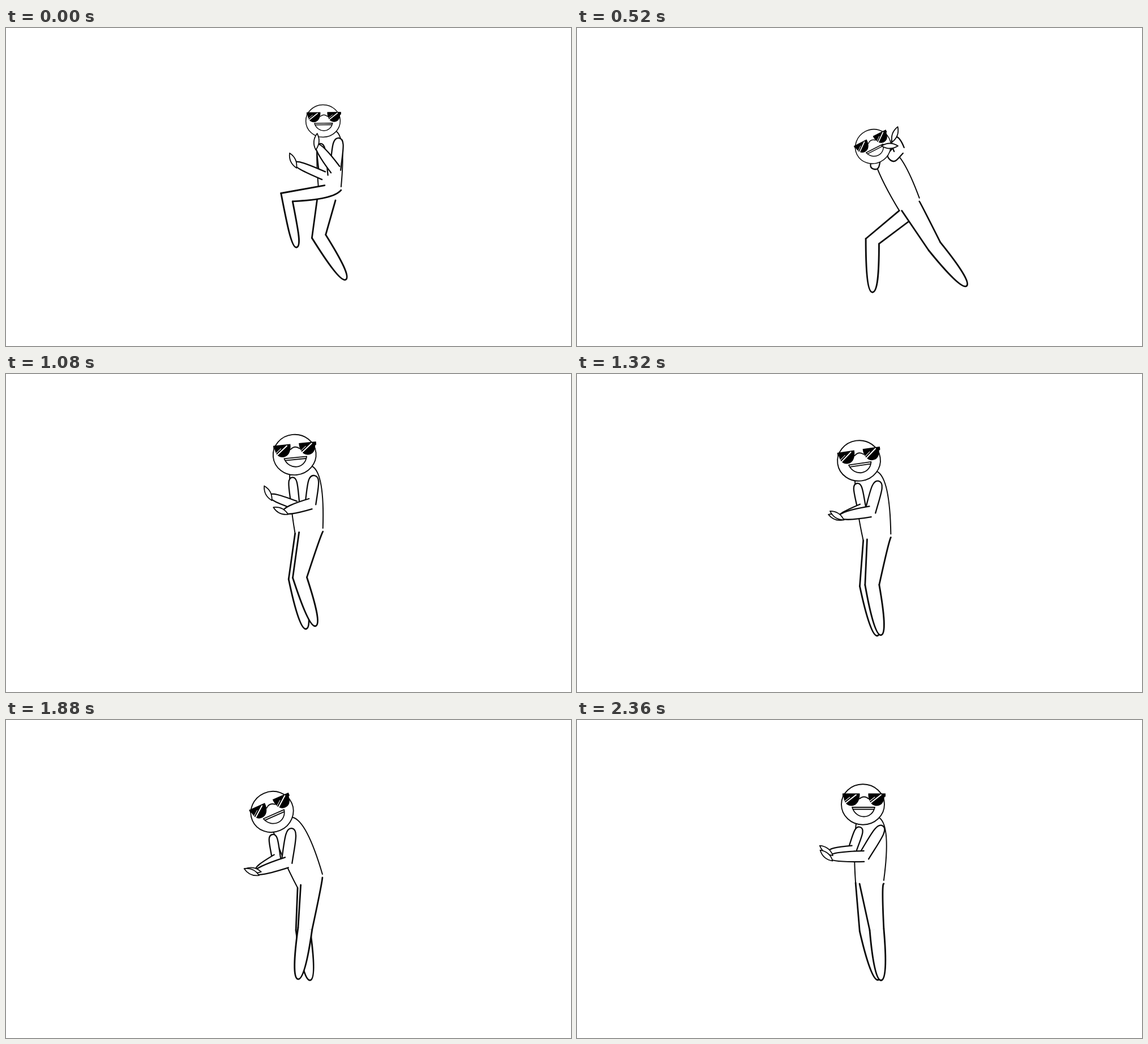
An HTML page with a canvas for the animation above (2400 ms loop, 998x561 px).

```html
<!DOCTYPE html>
<html lang="en">
<head>
<meta charset="utf-8">
<title>Dancing figure</title>
<style>
  html, body { margin: 0; width: 100%; height: 100%; overflow: hidden; background: #fff; }
  canvas { display: block; }
</style>
</head>
<body>
<canvas width="998" height="561"></canvas>
<script>
const ctx = document.querySelector('canvas').getContext('2d');
const LOOP = 2400, STEP = 40, THIGH = 81, SHIN = 90, HAND = 29;

// time, head x y, hip x y, near thigh and shin angle, far thigh and shin angle,
// near wrist x y, near elbow bend, far wrist x y, far elbow bend
const poses = [
  [0, 560, 164, 572, 282, -81, 11, -6, 32, 548, 205, 52, 509, 238, 49],
  [520, 523, 209, 587, 311, 30, 39, -42, 0, 560, 192, -13, 548, 208, 8],
  [840, 517, 138, 547, 268, -17, 26, -14, 11, 526, 235, 21, 471, 191, 52],
  [1320, 498, 153, 530, 288, -9, 10, -5, 12, 463, 252, 30, 462, 254, 28],
  [1640, 451, 198, 549, 293, 5, -4, 2, 1, 457, 306, 30, 460, 300, 20],
  [1880, 470, 162, 537, 284, -9, -8, -1, 8, 438, 270, 32, 441, 266, 24],
  [2360, 505, 149, 517, 285, 6, 5, 4, 13, 444, 242, 30, 444, 233, 23]];

const smooth = u => u * u * (3 - 2 * u);
const add = ([x, y], [dx, dy], k = 1) => [x + dx * k, y + dy * k];
const mix = ([ax, ay], [bx, by]) => [(ax + bx) / 2, (ay + by) / 2];
const sub = (a, b) => add(a, b, -1);
const unit = ([x, y]) => { const d = Math.hypot(x, y) || 1; return [x / d, y / d]; };
const side = ([x, y]) => [y, -x];
// Angles run in degrees from straight down towards the right
const aim = angle => [Math.sin(angle * Math.PI / 180), Math.cos(angle * Math.PI / 180)];

// Smooth interpolation without overshoot
function poseAt(t) {
  const last = poses.length - 1;
  let i = 0;
  while (i < last - 1 && t >= poses[i + 1][0]) i++;
  const span = poses[i + 1][0] - poses[i][0], u = (t - poses[i][0]) / span;
  return poses[i].map((from, k) => {
    const secant = j => (poses[j + 1][k] - poses[j][k]) / (poses[j + 1][0] - poses[j][0]);
    const slope = j => {
      const a = secant(Math.max(j - 1, 0)), b = secant(Math.min(j, last - 1));
      return a * b > 0 ? 2 * a * b / (a + b) : 0;
    };
    return from + (poses[i + 1][k] - from) * smooth(u)
      + span * u * (1 - u) * ((1 - u) * slope(i) - u * slope(i + 1));
  });
}

function paint(path, width, filled = true) {
  ctx.lineWidth = width;
  ctx.fillStyle = '#fff';
  if (filled) ctx.fill(path);
  ctx.stroke(path);
}

// Two open curves with white between them
function band(a, aBend, aEnd, b, bBend, bEnd, width) {
  const lines = new Path2D(), area = new Path2D();
  lines.moveTo(...a);
  lines.quadraticCurveTo(...aBend, ...aEnd);
  lines.moveTo(...b);
  lines.quadraticCurveTo(...bBend, ...bEnd);
  area.moveTo(...a);
  area.quadraticCurveTo(...aBend, ...aEnd);
  area.lineTo(...bEnd);
  area.quadraticCurveTo(...bBend, ...b);
  ctx.fillStyle = '#fff';
  ctx.fill(area);
  paint(lines, width, false);
}

// Open shape from two joint corners to a rounded tip
function limb(left, right, tip, round, width) {
  const axis = sub(tip, mix(left, right)), out = side(unit(axis));
  const p = new Path2D();
  p.moveTo(...left);
  p.bezierCurveTo(...add(left, axis, 0.6), ...add(tip, out, -round), ...tip);
  p.bezierCurveTo(...add(tip, out, round), ...add(right, axis, 0.6), ...right);
  paint(p, width);
}

function segment(joint, tip, half, round) {
  const out = side(unit(sub(tip, joint)));
  limb(add(joint, out, -half), add(joint, out, half), tip, round, 2.3);
}

function drawLeg(hip, front, rear, rearBend, thigh, shin) {
  const knee = add(hip, aim(thigh), THIGH), across = side(aim((thigh + shin) / 2));
  const kneeFront = add(knee, across, -12.5), kneeRear = add(knee, across, 12.5);
  band(front, mix(front, kneeFront), kneeFront, rear, rearBend || mix(rear, kneeRear), kneeRear, 2.8);
  limb(kneeFront, kneeRear, add(knee, aim(shin), SHIN), 9, 2.9);
}

// Draws the arm and returns its hand, which goes on top of the head
function drawArm(shoulder, wrist, bend, half) {
  const elbow = add(mix(shoulder, wrist), side(unit(sub(wrist, shoulder))), bend);
  segment(elbow, shoulder, half, half + 3);
  segment(elbow, wrist, half, 7);
  const [x, y] = sub(wrist, elbow);
  const direction = aim(Math.atan2(x, y) * 180 / Math.PI - 42);
  return () => {
    const base = add(wrist, direction, -10), tip = add(base, direction, HAND);
    const middle = mix(base, tip), out = side(direction);
    const p = new Path2D();
    p.moveTo(...base);
    p.quadraticCurveTo(...add(middle, out, 9), ...tip);
    p.quadraticCurveTo(...add(middle, out, -9), ...base);
    paint(p, 1.8);
  };
}

function drawHead(center, scale, tilt) {
  ctx.save();
  ctx.translate(...center);
  ctx.rotate(tilt);
  ctx.scale(scale, scale);
  const face = new Path2D();
  face.ellipse(0, 0, 38, 35.7, 0, 0, Math.PI * 2);
  paint(face, 1.9);
  paint(new Path2D('M-19 5H21C16 27 -12 27 -19 5ZM-17 8.5H19'), 1.8);
  paint(new Path2D('M-6 -10Q2 -17 10 -10'), 1.8, false);
  for (const x of [-20, 24]) {
    ctx.save();
    ctx.translate(x, 0);
    ctx.scale(Math.sign(x), 1);
    ctx.fillStyle = '#000';
    ctx.fill(new Path2D('M16 -19.5H-14.5C-15 -7 -9 2.5 0 2.5C9 2.5 13 -4 14 -13L16 -14Z'));
    ctx.restore();
    ctx.save();
    ctx.translate(x, 0);
    ctx.strokeStyle = '#fff';
    ctx.lineWidth = 2;
    ctx.stroke(new Path2D('M-10 -3L8 -17'));
    ctx.lineWidth = 1;
    ctx.stroke(new Path2D('M-12 -6L-3 -13'));
    ctx.restore();
  }
  ctx.restore();
}

function draw(now) {
  const t = Math.floor(now % LOOP / STEP) * STEP;
  const [, headX, headY, hipX, hipY, nearThigh, nearShin, farThigh, farShin,
    nearX, nearY, nearBend, farX, farY, farBend] = poseAt(t);
  const head = [headX, headY], hip = [hipX, hipY];
  const size = 0.8 + 0.2 * smooth(Math.min(Math.max((t - 300) / 800, 0), 1));
  const spine = unit(sub(hip, head)), across = side(spine);
  const lean = Math.atan2(...spine);
  const fromHead = (down, out) => add(add(head, spine, down * size), across, out * size);

  ctx.fillStyle = '#fff';
  ctx.fillRect(0, 0, 998, 561);
  ctx.strokeStyle = '#0c0c0c';
  ctx.lineCap = ctx.lineJoin = 'round';

  const belly = add(hip, across, -25 * size), seat = add(hip, across, 25 * size);
  band(fromHead(33, -15), fromHead(75, -24), belly, fromHead(26, 27), fromHead(43, 46), seat, 2);

  const nearHip = add(hip, [4, 4]), farHip = add(hip, [-11, 5]);
  const thighSide = side(aim(nearThigh));
  drawLeg(farHip, belly, add(hip, [10, 22]), null, farThigh, farShin);
  drawLeg(nearHip, mix(belly, add(nearHip, thighSide, -15)), add(seat, [0, 6]),
    add(nearHip, thighSide, 17), nearThigh, nearShin);

  const farShoulder = add(head, [24 * Math.sin(lean) ** 2 - 5, 40]);
  const nearShoulder = add(head, [35 * size, 38 * size * Math.cos(lean) ** 2]);
  const hands = [
    drawArm(farShoulder, [farX, farY], farBend, 7.5),
    drawArm(nearShoulder, [nearX, nearY], nearBend, 9.5)];
  drawHead(head, size, 5 * Math.PI / 180 - lean);
  hands.forEach(drawHand => drawHand());
}

const start = performance.now();
function tick() {
  draw(performance.now() - start);
  requestAnimationFrame(tick);
}
tick();
</script>
</body>
</html>
```
